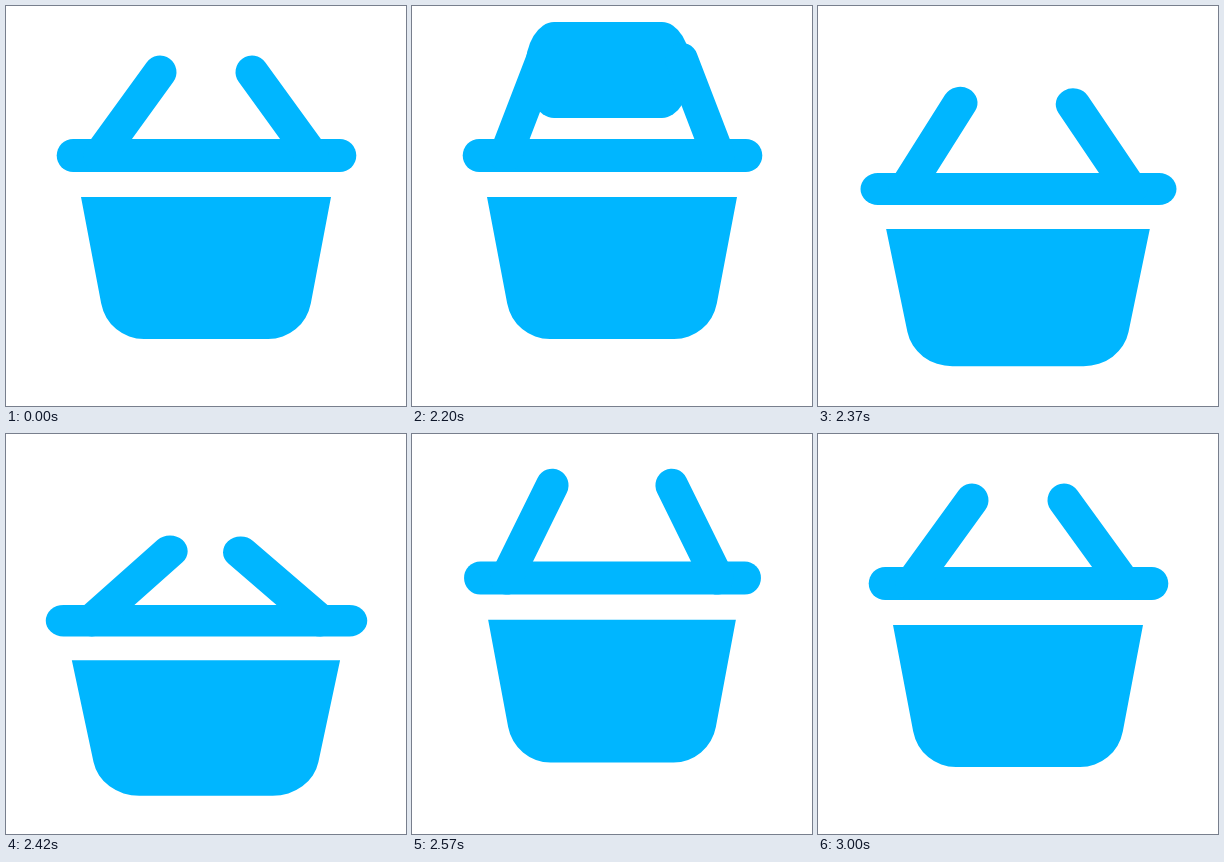
Animation, 400 px wide and 400 px high, one loop 3020 ms. Source, as an HTML page:

```html
<!DOCTYPE html>
<html lang="en">
<head>
<meta charset="utf-8">
<title>Basket</title>
<style>
  html, body { margin: 0; width: 100%; height: 100%; overflow: hidden; background: #fff; }
  svg { display: block; width: 100vw; height: 100vh; }
</style>
</head>
<body>
<svg viewBox="0 0 400 400" fill="#00b6ff">
  <defs>
    <clipPath id="above"><rect id="mask" width="400" height="150"/></clipPath>
  </defs>
  <g clip-path="url(#above)">
    <rect id="item" x="113" y="-48" width="166" height="96" rx="29" ry="48"/>
  </g>
  <g id="basket">
    <path d="M75 191H325L304.8 297.6A43.4 43.4 0 0 1 262 333H138A43.4 43.4 0 0 1 95.2 297.6Z"/>
    <g stroke="#00b6ff" stroke-width="33" stroke-linecap="round">
      <path d="M67.2 149.5H333.8"/>
      <path id="left" d="M0 0V-103"/>
      <path id="right" d="M0 0V-103"/>
    </g>
  </g>
</svg>
<script>
const LOOP = 3020, START = 2120;
const FLOOR = 333, RIM = 149.5, MIDDLE = 200.5;
const REST_LEAN = 35.9, OPENING = 15;

const el = id => document.getElementById(id);
const place = (id, transform) => el(id).setAttribute("transform", transform);

// Smooth rise from 0 to 1 between two times.
function ease(t, from, to) {
  const u = Math.min(1, Math.max(0, (t - from) / (to - from)));
  return (1 - Math.cos(Math.PI * u)) / 2;
}

// Dips under the weight, rebounds a little too far, then settles.
const drop = t => 31 * ease(t, 2255, 2410) - 35.5 * ease(t, 2410, 2505) + 4.5 * ease(t, 2575, 2800);
const stretch = t => 0.073 * ease(t, 2275, 2425) - 0.082 * ease(t, 2425, 2550) + 0.009 * ease(t, 2575, 2800);

// The item speeds up as it falls.
function itemY(t) {
  const s = t - 2200;
  return 64 + 1.7 * s + 0.003 * s * s;
}

// Handles open for the item, then swing like a damped spring.
function lean(t, release) {
  const s = Math.max(0, t - release);
  const swing = Math.exp(-0.0019 * s) * Math.cos(Math.PI * s / 125);
  const fade = 1 - ease(t, 2600, 2990);
  return REST_LEAN - OPENING * ease(t, 2110, 2205) * swing * fade;
}

// Motion runs in 25 ms steps whose starts fall on whole hundredths of a second.
const stepTime = ms => Math.floor((Math.floor(ms / 10) * 10 + 5) / 25) * 25;

function draw(ms) {
  const moving = ms >= START;
  const t = moving ? stepTime(ms) : 0;
  const wide = 1 + stretch(t), tall = 1 - 0.62 * stretch(t);
  const base = FLOOR + drop(t);
  place("basket", `translate(${MIDDLE} ${base}) scale(${wide} ${tall}) translate(${-MIDDLE} ${-FLOOR})`);
  place("left", `translate(93.6 ${RIM}) rotate(${lean(t, 2330)})`);
  place("right", `translate(306.4 ${RIM}) rotate(${-lean(t, 2325)})`);
  place("item", `translate(0 ${itemY(t)})`);
  el("item").setAttribute("visibility", moving ? "visible" : "hidden");
  el("mask").setAttribute("height", base + tall * (RIM - FLOOR));
}

const began = performance.now();
function tick() {
  draw((performance.now() - began) % LOOP);
  requestAnimationFrame(tick);
}
tick();
</script>
</body>
</html>
```
